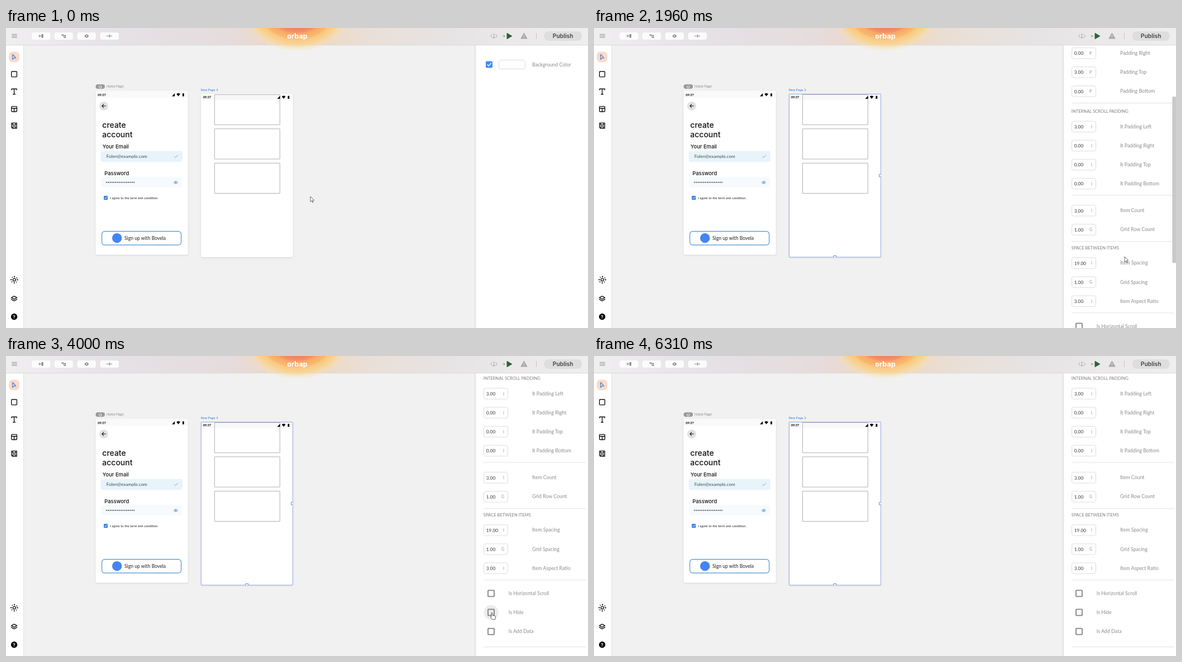
Write an HTML page that moves like this. It is 1042 px wide and 538 px high and loops after 6650 ms.

```html
<!DOCTYPE html>
<html lang="en">
<head>
<meta charset="utf-8">
<title>Page builder</title>
<style>
html, body { margin: 0; width: 100%; height: 100%; overflow: hidden; background: #f1f1f1; }
svg { display: block; width: 100%; height: 100%; }
text { font-family: Lato, "Open Sans", sans-serif; }
.wide { font-family: Inter, Roboto, sans-serif; }
.label { font-size: 8.85px; fill: #8b8b8b; }
.button { font-size: 9.05px; fill: #747474; }
.heading { font-size: 7.6px; fill: #7d7d7d; }
.value { font-size: 8.3px; fill: #333; }
.unit { font-size: 6.8px; fill: #8a8a8a; }
.field { fill: #fff; stroke: #dcdcdc; }
.line { fill: none; stroke: #111; stroke-width: 1.4; stroke-linecap: round; stroke-linejoin: round; }
.grey { stroke: #8d8d8d; stroke-width: 1; }

.before, .picked, .scroll, .thumb, .list, .over, .away, .tick, .mark, .pointer {
  animation: 6.65s infinite step-end;
}
.before { animation-name: before; }
.picked { animation-name: picked; }
.scroll { animation-name: scroll; }
.list { animation-name: list; }
.over { animation-name: over; }
.away { animation-name: away; }
.tick { animation-name: tick; }
.thumb { animation-name: thumb-move, thumb-fade; animation-timing-function: step-end, linear; }
.mark { animation-name: mark; animation-timing-function: linear; }
.pointer { animation-name: pointer; animation-timing-function: ease-in-out; }

@keyframes before { 0% { opacity: 1 } 4.51%, 100% { opacity: 0 } }
@keyframes picked { 0% { opacity: 0 } 4.51%, 100% { opacity: 1 } }
@keyframes scroll {
  0% { transform: translateY(0) }
  20% { transform: translateY(-76.3px) }
  24.21% { transform: translateY(-152.6px) }
  27.37% { transform: translateY(-228.9px) }
  33.53% { transform: translateY(-305.2px) }
  34.59%, 100% { transform: translateY(-338.3px) }
}
@keyframes thumb-move {
  0% { transform: translateY(-3px) }
  20% { transform: translateY(39px) }
  24.21% { transform: translateY(81px) }
  27.37% { transform: translateY(123px) }
  33.53% { transform: translateY(165px) }
  34.59%, 100% { transform: translateY(183px) }
}
@keyframes thumb-fade {
  0%, 19.99% { opacity: 0 }
  20%, 41% { opacity: 1 }
  44%, 71.7% { opacity: 0 }
  72.5%, 74% { opacity: 1 }
  77%, 100% { opacity: 0 }
}
@keyframes list {
  0% { opacity: 1 } 51.13% { opacity: 0 } 59.25% { opacity: 1 }
  80.15% { opacity: 0 } 86.47%, 100% { opacity: 1 }
}
@keyframes over {
  0% { opacity: 0 } 47.8% { opacity: 1 } 62.3% { opacity: 0 }
  76.3% { opacity: 1 } 88% { opacity: 0 } 100% { opacity: 0 }
}
@keyframes away {
  0% { opacity: 1 } 47.8% { opacity: 0 } 62.3% { opacity: 1 }
  76.3% { opacity: 0 } 88% { opacity: 1 } 100% { opacity: 1 }
}
@keyframes tick {
  0% { opacity: 0 } 49.9% { opacity: 1 } 59.25% { opacity: 0 }
  79.1% { opacity: 1 } 86.47%, 100% { opacity: 0 }
}
@keyframes mark {
  0%, 51.1% { stroke-dashoffset: 8 }
  54.1%, 59.24% { stroke-dashoffset: 0 }
  59.25%, 80.1% { stroke-dashoffset: 8 }
  83.3%, 86.46% { stroke-dashoffset: 0 }
  86.47%, 100% { stroke-dashoffset: 8 }
}
@keyframes pointer {
  0%, 1.35% { transform: translate(545px, 302px) }
  3.16%, 4.6% { transform: translate(508px, 313px) }
  8.57% { transform: translate(764px, 336px); animation-timing-function: linear }
  10.7% { transform: translate(850px, 365px); animation-timing-function: ease-out }
  19.5%, 34.6% { transform: translate(950px, 410px) }
  37.74%, 40% { transform: translate(912px, 437px) }
  48.5%, 61.2% { transform: translate(870px, 460px) }
  67.5% { transform: translate(1033px, 511px) }
  69.6%, 71% { transform: translate(1044px, 540px) }
  72.5% { transform: translate(1034px, 518px) }
  77%, 86.9% { transform: translate(870px, 460px) }
  94.6%, 100% { transform: translate(990px, 542px) }
}
</style>
</head>
<body>
<svg viewBox="0 0 1042 538" preserveAspectRatio="none">
  <defs>
    <linearGradient id="bar">
      <stop offset="0" stop-color="#f0eff0"/>
      <stop offset=".2" stop-color="#e5e1e5"/>
      <stop offset=".38" stop-color="#e5dcdd"/>
      <stop offset=".5" stop-color="#f0d5bd"/>
      <stop offset=".62" stop-color="#eadfd6"/>
      <stop offset=".75" stop-color="#e6e3e4"/>
      <stop offset="1" stop-color="#efeeef"/>
    </linearGradient>
    <radialGradient id="glow">
      <stop offset=".35" stop-color="#ef7f68"/>
      <stop offset=".47" stop-color="#f3936a"/>
      <stop offset=".5" stop-color="#f6a866"/>
      <stop offset=".64" stop-color="#f8ba70"/>
      <stop offset=".67" stop-color="#f9c880"/>
      <stop offset=".8" stop-color="#f9d493" stop-opacity=".9"/>
      <stop offset="1" stop-color="#f8e6bd" stop-opacity="0"/>
    </radialGradient>
    <filter id="shadow" x="-10%" y="-10%" width="120%" height="120%">
      <feDropShadow dx="0" dy="1" stdDeviation="1.6" flood-opacity=".13"/>
    </filter>
    <g id="status">
      <text x="164.3" y="121.6" font-size="5.6" font-weight="700">09:37</text>
      <path d="M297 122.5h5.2v-5.4ZM305.3 118.3q3.3-2.4 6.6 0l-3.3 4.3Z"/>
      <path d="M316 117.6h.8v-.7h1.2v.7h.8v5h-2.8Z"/>
    </g>
  </defs>

  <rect width="1042" height="538" fill="#f1f1f1"/>

  <!-- Sign-up page -->
  <g>
    <rect x="160.5" y="101" width="16.5" height="8" rx="4" fill="#999"/>
    <path d="M166 105.2l2.8-2.3 2.8 2.3M167 105v2.4h3.6V105" class="line" style="stroke:#fff;stroke-width:.7"/>
    <text class="wide" x="180" y="107.4" font-size="5.6" fill="#888">Home Page</text>
    <rect x="160.5" y="112.5" width="165" height="294" rx="3" fill="#fff" filter="url(#shadow)"/>
    <path d="M161 125V115q0-2 2-2h160q2 0 2 2v10Z" fill="#f9f9f9"/>
    <use href="#status"/>
    <circle cx="175" cy="140" r="8" fill="#e2e2e2"/>
    <path class="line" style="stroke-width:1.1" d="M178.3 139.8h-6.4m2.8-2.9l-2.9 2.9 2.9 2.9"/>
    <g class="wide" font-weight="500" fill="#111">
      <text class="wide" x="172.3" y="179" font-size="14">create</text>
      <text class="wide" x="172.3" y="196" font-size="14">account</text>
      <text class="wide" x="172.8" y="216" font-size="9.4">Your Email</text>
      <text class="wide" x="176.3" y="263.6" font-size="9.4">Password</text>
    </g>
    <rect x="169.5" y="220.5" width="146.5" height="19.5" rx="4" fill="#e8f3fa"/>
    <text x="179.8" y="233.2" font-size="8.1" fill="#3c4f4f">Folen@example.com</text>
    <path class="line" style="stroke:#6fa8d8;stroke-width:1" d="M301.7 230.6l1.9 1.8 3.6-4"/>
    <rect x="170" y="267" width="146" height="19" rx="4" fill="#f7fafc"/>
    <path d="M180 276.8h50" fill="none" stroke="#333" stroke-width="2" stroke-linecap="round" stroke-dasharray="0 3.27"/>
    <path d="M300.2 277q3.7-4.6 7.4 0q-3.7 4.6-7.4 0Z" fill="none" stroke="#4d96d8"/>
    <circle cx="303.9" cy="277" r="1.3" fill="#4d96d8"/>
    <rect x="175" y="301" width="7.2" height="7.2" rx="1" fill="#3b82e6"/>
    <path class="line" style="stroke:#fff;stroke-width:.9" d="M176.7 304.7l1.4 1.4 2.6-2.9"/>
    <text x="186.3" y="306.6" font-size="5.9" fill="#222">I agree to the term and condition.</text>
    <rect x="171.6" y="364.7" width="142" height="24.4" rx="5" fill="#fff" stroke="#4a94d4" stroke-width="1.2"/>
    <circle cx="198.7" cy="376.7" r="8.7" fill="#4285f4"/>
    <text x="212" y="379.6" font-size="8.6" fill="#222">Sign up with Bovela</text>
  </g>

  <!-- List page -->
  <g>
    <text class="wide" x="348.8" y="113.3" font-size="5.4" fill="#2f78d0">New Page 3</text>
    <rect x="349" y="118" width="164.7" height="293" rx="3" fill="#fff" filter="url(#shadow)"/>
    <path d="M349.5 129.3V119h164v10.3Z" fill="#f8f8f8"/>
    <g class="list">
      <g fill="none" stroke="#b2b2b2">
        <path d="M373.5 119.5h116.8v53.9h-116.8Z"/>
        <path d="M373.5 180.8h116.8v54.2h-116.8Z"/>
        <path d="M373.5 242.3h116.8v54.2h-116.8Z"/>
      </g>
      <g class="picked" fill="#fff" stroke="#4b8ee0">
        <path d="M349.5 118.5h163.8v292.3H349.5Z" fill="none" stroke="#9fb0dd"/>
        <path d="M513.5 262.2h-2.7v4.8h2.7M428.8 411v-2.6h5v2.6"/>
      </g>
    </g>
    <use href="#status" x="188.5" y="4.5"/>
  </g>

  <!-- Property panel -->
  <rect x="839" y="30" width="2" height="508" fill="#e3e3e3"/>
  <rect x="841" y="30" width="201" height="508" fill="#fff"/>
  <g class="before">
    <rect x="859" y="59.5" width="12" height="12" rx="2" fill="#3f8cf0"/>
    <path class="line" style="stroke:#fff" d="M862 65.7l2.2 2.2 4.2-4.7"/>
    <rect class="field" x="882.5" y="57.5" width="47" height="16" rx="3"/>
    <text class="label" x="942" y="68.6">Background Color</text>
  </g>
  <g class="picked"><g class="scroll" id="props"></g></g>
  <rect class="thumb" x="1035.3" width="7" height="298.5" rx="2" fill="#c9c9c9"/>

  <!-- Sidebar -->
  <rect y="30" width="31" height="508" fill="#fff"/>
  <rect x="31" y="30" width="1" height="508" fill="#e3e3e3"/>
  <rect x="5" y="42.5" width="19" height="19" rx="7" fill="#fbdacb"/>
  <path class="line" style="stroke:#3178c8;stroke-width:1.1" d="M11.8 47.3v9l2.3-2.2 3.6-.4Z"/>
  <g class="line">
    <rect x="9.8" y="78" width="9.6" height="9.6" rx="1"/>
    <path d="M10 111v-1.8h9.2v1.8M14.6 109.2v9.6m-1.8 0h3.6"/>
    <rect x="9.8" y="140.6" width="9.6" height="9.4" rx="1"/>
    <path d="M9.8 144h9.6M14.6 144v6"/>
    <path d="M10 170.4h9.2v9.4H11.3l-1.3-1.3ZM12 170.4v3.6h5.2v-3.6M12.2 179.6v-2.7h4.8v2.7"/>
    <path d="M9.6 483.6l5-2.8 5 2.8-5 2.8ZM9.6 486.6l5 2.8 5-2.8"/>
    <circle cx="14.8" cy="451.5" r="2.4"/>
    <circle cx="14.8" cy="451.5" r="5.7" stroke-dasharray="0 4.477" stroke-width="1.8"/>
    <path d="M14.8 445.2v1.4m0 9.8v1.4M8.5 451.5h1.4m9.8 0h1.4"/>
  </g>
  <circle cx="14.6" cy="517.8" r="5.7"/>
  <text class="wide" x="14.6" y="520.7" font-size="8" font-weight="700" fill="#fff" text-anchor="middle">?</text>

  <!-- Top bar -->
  <rect y="30" width="1042" height="1.2" fill="#dcdcdc"/>
  <rect width="1042" height="30" fill="url(#bar)"/>
  <ellipse cx="521" cy="-22" rx="96" ry="64" fill="url(#glow)"/>
  <path class="line grey" d="M10.5 11.4h9m-9 2.8h9m-9 2.8h9"/>
  <g fill="#fff" fill-opacity=".85">
    <rect x="46" y="8" width="33.5" height="13" rx="3.5"/>
    <rect x="86.5" y="8" width="33.5" height="13" rx="3.5"/>
    <rect x="127.5" y="8" width="33.5" height="13" rx="3.5"/>
    <rect x="168.5" y="8" width="33.5" height="13" rx="3.5"/>
  </g>
  <g fill="#888">
    <path d="M58 13.8h2v-2h1v2h2v1h-2v2h-1v-2h-2ZM63.5 11h3.2v6.6h-3.2Z"/>
    <path d="M99.5 11.5h2.8v2.2h-2.8ZM104.5 12.7h2.8v2.2h-2.8ZM104.5 15.7h2.8v2.2h-2.8Z"/>
    <path d="M140.3 14.4q4-5.6 8 0q-4 5.6-8 0Z"/>
  </g>
  <circle cx="144.3" cy="14.4" r="1.2" fill="#fff"/>
  <path class="line grey" d="M102 12.7h2M103.2 12.7v4h1M180 14.3h9.6m-4-2.8v5.6"/>
  <text class="wide" x="521.5" y="19" font-size="12.7" font-weight="700" fill="#fff" text-anchor="middle">orbap</text>
  <path class="line grey" d="M870.6 11.2l-3 3.2 3 3.2M876.5 11.2l3 3.2-3 3.2M873.5 10.2v8.4m-1.6-1.8l1.6 1.8 1.6-1.8" style="stroke:#aaa"/>
  <circle cx="891.7" cy="14.4" r="1.5" fill="#999"/>
  <path d="M897 9.3v10.3l8.8-5.1Z" fill="#2c6339" stroke="#2c6339" stroke-linejoin="round"/>
  <path d="M927.4 9.5l5.2 9.3h-10.4Z" fill="#aaa" stroke="#aaa" stroke-width="1.4" stroke-linejoin="round"/>
  <path d="M927.4 12.7v3m0 1.4v.8" stroke="#eee"/>
  <path d="M949.5 9v11" stroke="#c4c4c4"/>
  <rect x="963.5" y="6" width="67.5" height="17" rx="8" fill="#dedede"/>
  <text class="wide" x="997.2" y="18.3" font-size="10.3" font-weight="600" fill="#444" text-anchor="middle">Publish</text>

  <!-- Pointer -->
  <g class="pointer">
    <path class="away" d="M0 0v9.6l2.2-2 1.6 3.4 1.5-.7-1.6-3.3h3Z" fill="#fff" stroke="#444" stroke-width=".8"/>
    <path class="over" d="M-1 .9q1-1.4 2 0v4.2l4.2.9q1.6.5 1.4 2l-.7 4.6H.6L-2.6 8.5q-.3-1.4 1.6-.7Z" fill="#fff" fill-opacity=".85" stroke="#444" stroke-width=".8"/>
  </g>
</svg>
<script>
const text = (cls, x, y, s) => `<text class="${cls}" x="${x}" y="${y}">${s}</text>`;
const box = (x, y, w, h) => `<rect class="field" x="${x}" y="${y}" width="${w}" height="${h}" rx="3"/>`;
const rule = y => `<path d="M855 ${y}h183.5" stroke="#e2e2e2"/>`;
const heading = (y, s) => text('heading', 854.8, y + 2.8, s);
const ROW = 34.1;

// The cover rect cuts long values off before the unit letter.
const field = (y, value, unit, name) =>
  box(855.5, y - 9.7, 43, 19.4) + text('value', 859.8, y + 3.2, value) +
  `<rect x="883" y="${y - 6}" width="14" height="12" fill="#fff"/>` +
  text('unit', unit === 'I' ? 890 : 887, y + 2.8, unit) +
  text('label', 942, y + 2.9, name);

const fields = (y, rows) => rows.map(([value, name], i) =>
  field(y + i * ROW, value, name[0], name)).join('');

const sides = (prefix, left, top) => ['Left', 'Right', 'Top', 'Bottom'].map(side =>
  [side === 'Left' ? left : side === 'Top' ? top : '0.00', `${prefix}Padding ${side}`]);

const hover = y => `<circle class="over" cx="868.5" cy="${y}" r="13.3" fill="#ececec"/>`;
const tick = y => `<g class="tick"><rect x="862.5" y="${y - 6}" width="12" height="12" fill="#f3ee35" fill-opacity=".9"/>
  <path class="line mark" style="stroke:#fff" stroke-dasharray="8 8" d="M865.5 ${y}l2 2 3.8-4.2"/></g>`;
const check = (y, name, live) =>
  (live ? hover(y) + tick(y) : '') +
  `<rect x="863" y="${y - 5.5}" width="11" height="11" rx=".8" fill="none" stroke="#6c6c6c" stroke-width="1.5"/>` +
  text('label', 899.8, y + 2.9, name);

const undoIcon = `<path d="M868.5 53.5h6.5v10h-6.5Z" fill="#a2a2a2"/>
  <path d="M869.5 56h4.5m-4.5 2.5h4.5m-4.5 2.5h4.5" stroke="#fff" stroke-width=".7"/>`;
const addIcon = `<path d="M867 98h2v-2h1v2h2v1h-2v2h-1v-2h-2ZM873 95h4v7.5h-4Z" fill="#8d8d8d"/>`;

document.getElementById('props').innerHTML = [
  box(855.5, 46.5, 95.5, 23.5), undoIcon, text('button', 885, 61.6, 'Undo-List'),
  box(855.5, 87, 148.5, 23), addIcon, text('button', 885.4, 102, 'Add Pages to PageList'),
  ...[81.5, 122, 201, 363.5, 529, 611.8, 739.8, 859.8].map(rule),
  fields(145.8, [['433.00', 'Width'], ['890.36', 'Height']]),
  heading(212.2, 'PADDING'),
  fields(240, sides('', '0.00', '3.00')),
  heading(378.3, 'INTERNAL SCROLL PADDING'),
  fields(405.8, sides('It ', '3.00', '0.00')),
  fields(556.4, [['3.00', 'Item Count'], ['1.00', 'Grid Row Count']]),
  heading(623.3, 'SPACE BETWEEN ITEMS'),
  fields(650.5, [['19.00', 'Item Spacing'], ['1.00', 'Grid Spacing'], ['3.00', 'Item Aspect Ratio']]),
  check(764, 'Is Horizontal Scroll'),
  check(798.1, 'Is Hide', true),
  check(832.2, 'Is Add Data')
].join('');
</script>
</body>
</html>
```
